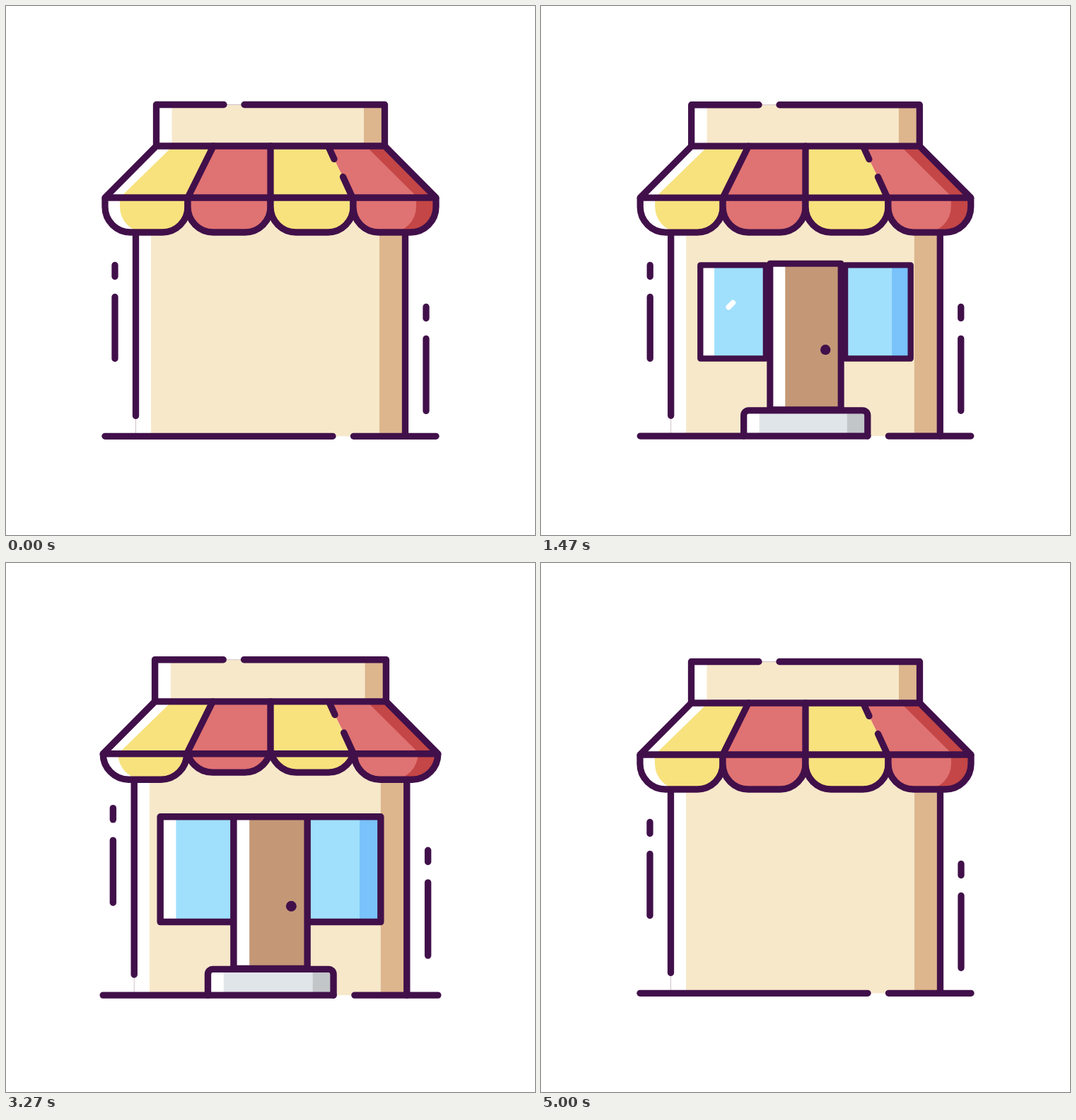
These frames come from a looping animation (748 px wide and 748 px high, 5030 ms). An HTML page with a canvas:

```html
<!DOCTYPE html>
<html lang="en">
<head>
<meta charset="utf-8">
<title>Little shop</title>
<style>
html, body { margin: 0; width: 100%; height: 100%; overflow: hidden; background: #fff; }
canvas { display: block; width: 748px; height: 748px; }
</style>
</head>
<body>
<canvas id="stage" width="748" height="748"></canvas>
<script>
const ctx = document.getElementById('stage').getContext('2d');
const LOOP = 5030, FPS = 30, BEAT = 75, MID = 374;
const EAVE = 271, ROOF = 198, GROUND = 608.3, FLAP = 117, STROKE = 9.3;
const INK = '#41104a', CREAM = '#f7e8ca', TAN = '#ddb68e', YELLOW = '#f7e27e',
      RED = '#df7272', DARK_RED = '#c44646', SKY = '#a0e0fd', BLUE = '#79c2fa',
      BROWN = '#c49876', WHITE = '#fff', PALE = '#d0c2cc';

const ease = x => (1 - Math.cos(Math.PI * x)) / 2;

// Passes through the values in turn, taking `span` steps from each to the next.
function glide(n, start, span, values) {
  const last = values.length - 1;
  const p = Math.min(last, Math.max(0, (n - start) / span));
  const i = Math.min(last - 1, Math.floor(p));
  return values[i] + (values[i + 1] - values[i]) * ease(p - i);
}

const pop = (n, enter, leave) =>
  glide(n, enter, 15, [0, 1.1, .9, 1]) * glide(n, leave, 12, [1, 1.1, 0]);

function box(x0, y0, x1, y1, color) {
  ctx.fillStyle = color;
  ctx.fillRect(x0, y0, x1 - x0, y1 - y0);
}

// White on the left, the main colour, then the shade on the right.
function shaded(x0, y0, x1, y1, main, light, shade, dark) {
  box(x0, y0, x1, y1, main);
  if (light) box(x0, y0, x0 + light, y1, WHITE);
  if (shade) box(x1 - shade, y0, x1, y1, dark);
}

function outline(width = STROKE, color = INK) {
  ctx.strokeStyle = color;
  ctx.lineWidth = width;
  ctx.stroke();
}

function trace(points) {
  ctx.beginPath();
  for (let i = 0; i < points.length; i += 2) ctx.lineTo(points[i], points[i + 1]);
}

function line(points, width, color) {
  trace(points);
  outline(width, color);
}

function fill(color) {
  ctx.fillStyle = color;
  ctx.fill();
}

function frame(x0, y0, x1, y1) {
  line([x0, y0, x1, y0, x1, y1, x0, y1, x0, y0]);
}

function scaled(x, y, s, draw) {
  if (s < .005) return;
  ctx.save();
  ctx.translate(x, y);
  ctx.scale(s, s);
  ctx.translate(-x, -y);
  draw();
  ctx.restore();
}

function drawDashes(lift) {
  for (const [x, top, length] of [[154, 366.5, 132], [594, 425.5, 147]]) {
    const y = top - lift;
    line([x, y, x, y + 16]);
    line([x, y + 45, x, y + length]);
  }
}

function drawWalls() {
  shaded(183.5, EAVE, 564.5, GROUND, CREAM, 21.5, 36.5, TAN);
  line([183.5, 580, 183.5, 604], 1, PALE);
  line([183.5, EAVE, 183.5, 579.5]);
  line([564.5, EAVE, 564.5, GROUND]);
}

// p runs 0..1 while the streak grows and 1..2 while its tail catches up.
function glint(x, y, p) {
  if (p <= 0 || p >= 2) return;
  const a = 27 * Math.max(0, p - 1), b = 27 * Math.min(1, p);
  line([x + a, y - a, x + b, y - b], 8.5, WHITE);
}

function drawWindows(n) {
  const size = pop(n, 14, 125), top = 359, low = 506;
  scaled(271.5, 432.5, size, () => {
    shaded(220, top, 323, low, SKY, 22);
    frame(220, top, 323, low);
    glint(264.5, 425, glide(n, 41, 9, [0, 1, 2]));
  });
  scaled(476.5, 432.5, size, () => {
    shaded(425, top, 528, low, SKY, 0, 29.5, BLUE);
    frame(425, top, 528, low);
    glint(480, 452, glide(n, 60, 10, [0, 1, 2]));
  });
}

function drawDoor(n) {
  scaled(MID, 571, pop(n, 4, 118), () => {
    shaded(322.5, 359, 425.5, 571, BROWN, 22);
    frame(322.5, 359, 425.5, 571);
    ctx.beginPath();
    ctx.arc(403, 484, 7.4, 0, Math.PI * 2);
    fill(INK);
  });
}

function drawStep(n) {
  scaled(MID, GROUND, pop(n, 0, 119), () => {
    const path = new Path2D();
    path.moveTo(286.5, GROUND);
    path.arcTo(286.5, 572, MID, 572, 7);
    path.arcTo(462, 572, 462, GROUND, 7);
    path.lineTo(462, GROUND);
    ctx.save();
    ctx.clip(path);
    shaded(286.5, 572, 462, GROUND, '#e0e5e9', 22, 29, '#c2c6c9');
    ctx.restore();
    ctx.strokeStyle = INK;
    ctx.lineWidth = STROKE;
    ctx.stroke(path);
  });
}

function drawSign() {
  const left = 212.5, right = 535.5, top = 139.5;
  shaded(left, top, right, ROOF, CREAM, 22, 29.5, TAN);
  line([310, top, 335, top], 1, PALE);
  line([308, top, left, top, left, ROOF]);
  line([337, top, right, top, right, ROOF]);
}

const roofX = i => 212.5 + i * 80.75;
const eaveX = i => 140 + i * FLAP;

function panel(i, from, to, color) {
  const at = (edge, f) => edge(i) + (edge(i + 1) - edge(i)) * f;
  trace([at(roofX, from[0]), ROOF, at(roofX, to[0]), ROOF,
         at(eaveX, to[1]), EAVE, at(eaveX, from[1]), EAVE]);
  fill(color);
}

function flapPath(x0, x1, low) {
  ctx.beginPath();
  ctx.moveTo(x0, low - 49);
  ctx.arcTo(x0, low, x1, low, 36);
  ctx.arcTo(x1, low, x1, low - 49, 36);
  ctx.lineTo(x1, low - 49);
}

// Flaps slide up behind the eave one after another, once per beat.
function drawFlap(i, beat, color) {
  const low = 320 - 24.5 * glide(beat, 4.5 + i * 4, 12.5, [0, 1, 0]);
  const x0 = eaveX(i), x1 = eaveX(i + 1);
  flapPath(x0, x1, low);
  fill(i === 0 ? WHITE : i === 3 ? DARK_RED : color);
  flapPath(i === 0 ? x0 + 21 : x0, i === 3 ? x1 - 28 : x1, low);
  fill(color);
  flapPath(x0, x1, low);
  outline();
}

function drawAwning(beat) {
  const colors = [YELLOW, RED, YELLOW, RED];
  const start = [0, 0], end = [1, 1];
  ctx.save();
  ctx.beginPath();
  ctx.rect(0, EAVE, 748, 100);
  ctx.clip();
  colors.forEach((color, i) => drawFlap(i, beat, color));
  ctx.restore();

  colors.forEach((color, i) => panel(i, start, end, color));
  panel(0, start, [.29, .18], WHITE);
  panel(3, [.67, .78], end, DARK_RED);
  line([roofX(1), ROOF, eaveX(1), EAVE]);
  line([MID, ROOF, MID, EAVE]);
  line([456, 199, 464, 216.5]);
  line([476.5, 241.5, 490, EAVE]);
  line([eaveX(0), EAVE, roofX(0), ROOF, roofX(4), ROOF, eaveX(4), EAVE, eaveX(0), EAVE]);
}

function render(n) {
  const beat = n % BEAT;
  const zoom = glide(beat, 0, 15, [1, 1.15, .9, 1]);
  const tilt = glide(beat, 45, 10, [0, 3, -3, 0]);
  ctx.setTransform(1, 0, 0, 1, 0, 0);
  box(0, 0, 748, 748, WHITE);
  ctx.lineCap = ctx.lineJoin = 'round';
  ctx.translate(MID, MID);
  ctx.rotate(tilt * Math.PI / 180);
  ctx.scale(zoom, zoom);
  ctx.translate(-MID, -MID);

  drawDashes(glide(beat, 0, 21, [0, 20, 0]));
  drawWalls();
  drawWindows(n);
  drawDoor(n);
  drawStep(n);
  line([140, GROUND, 462, GROUND]);
  line([491.5, GROUND, 608, GROUND]);
  drawSign();
  drawAwning(beat);
}

const start = performance.now();
function tick() {
  const t = (performance.now() - start) % LOOP;
  render(Math.floor(t * FPS / 1000 + .11));
  requestAnimationFrame(tick);
}
tick();
</script>
</body>
</html>
```
